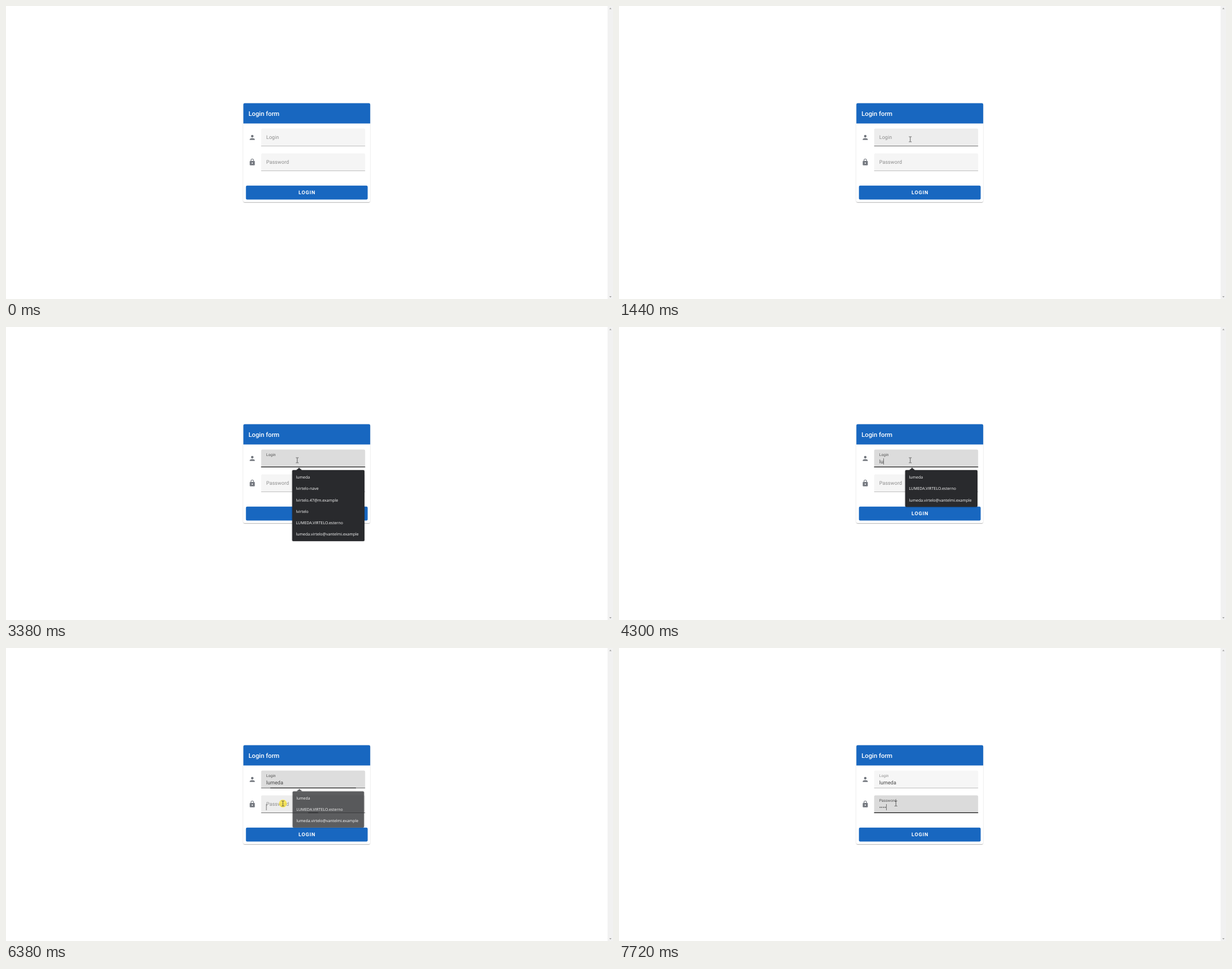
These frames come from a looping animation (1077x520 px, 8000 ms). An HTML page:

```html
<!DOCTYPE html>
<html lang="en">
<head>
<meta charset="utf-8">
<title>Login form</title>
<style>
  html, body { margin: 0; width: 100%; height: 100%; overflow: hidden; background: #fff; }
  svg { position: absolute; left: 0; top: 0; font: 9px Roboto, sans-serif; text-rendering: geometricPrecision; }
  .card {
    position: absolute; left: 421.2px; top: 172.6px; width: 225px; height: 175.4px; border-radius: 2.25px;
    box-shadow: 0 1.7px .6px -1.1px #0003, 0 1.1px 1.1px #00000024, 0 .6px 2.8px #0000001f;
  }
  .title { font-size: 11.25px; font-weight: 500; fill: #fff; }
  .button { font-weight: 700; letter-spacing: .0893em; fill: #fff; text-anchor: middle; }
  .label { letter-spacing: .009em; }
  .value { letter-spacing: .009em; fill: #444; }
  .icon { fill: #757980; }
  .popup { font: 7px "Open Sans", "Noto Sans", sans-serif; fill: #fff; filter: drop-shadow(0 .6px 1.2px #0006); }
</style>
</head>
<body>
<div class="card"></div>
<svg width="1077" height="520" viewBox="0 0 1077 520">
  <rect x="1067.4" width="9.6" height="520" fill="#f1f1f1"/>
  <path d="M1070.4 5.4l2-2.4 2 2.4zM1070.4 515l2 2.4 2-2.4z" fill="#a3a3a3"/>
  <path d="M421.2 208.6V174.85q0-2.25 2.25-2.25H643.95q2.25 0 2.25 2.25V208.6z" fill="#1867c0"/>
  <text class="title" x="430.2" y="194.5">Login form</text>
  <path class="icon" transform="translate(430.2 226.6) scale(.5625)" d="M12 4a4 4 0 0 1 0 8a4 4 0 0 1 0-8M12 14c4.42 0 8 1.79 8 4v2H4v-2c0-2.21 3.58-4 8-4z"/>
  <path class="icon" fill-rule="evenodd" transform="translate(430.2 270.4) scale(.5625)" d="M12 17a2 2 0 0 0 0-4a2 2 0 0 0 0 4M18 8a2 2 0 0 1 2 2v10a2 2 0 0 1-2 2H6a2 2 0 0 1-2-2V10a2 2 0 0 1 2-2h1V6a5 5 0 0 1 10 0v2zM12 3a3 3 0 0 0-3 3v2h6V6a3 3 0 0 0-3-3z"/>
  <g id="fields"></g>
  <rect x="425.7" y="318.8" width="216" height="24.75" rx="2.25" fill="#1867c0"/>
  <text class="button" x="534.1" y="334.3">LOGIN</text>
  <g id="popup" class="popup"></g>
  <circle id="click" r="7" fill="#f7e13c" opacity=".8"/>
  <path id="arrow" d="M0 0v9.5l2.2-2 1.4 3.3 1.4-.6L3.6 7h3z" fill="#fff" stroke="#000" stroke-width=".5"/>
  <path id="beam" d="M-2.4-4.5H-.6L0-4 .6-4.5H2.4M0-4V4M-2.4 4.5H-.6L0 4 .6 4.5H2.4" fill="none" stroke="#333" stroke-width=".75"/>
</svg>
<script>
const LOOP = 8000, FIELD_W = 184.5;
const $ = id => document.getElementById(id);
const set = (el, attrs) => { for (const k in attrs) el.setAttribute(k, attrs[k]); };
const show = (el, on) => { el.style.display = on ? '' : 'none'; };
const clamp = v => Math.min(1, Math.max(0, v));
const easeOut = p => 1 - (1 - p) ** 3;
const gray = v => `rgb(${v},${v},${v})`;

// Linear interpolation through [time, value] points
function track(t, points) {
  let [t0, v0] = points[0];
  for (const [t1, v1] of points) {
    if (t < t1) return v0 + (v1 - v0) * clamp((t - t0) / (t1 - t0));
    [t0, v0] = [t1, v1];
  }
  return v0;
}

const BURSTS = [[260, 950, 11], [1090, 1440, 6], [1770, 2110, 6], [5700, 6240, 9], [6380, 6650, 5]];
function tick(t) {
  let m = 0;
  for (const [start, end, steps] of BURSTS) {
    if (t < start) break;
    const dt = (end - start) / (steps - 1);
    m = Math.min(end, start + Math.floor((t - start) / dt + .15) * dt);
  }
  return m;
}

function makeField(name, y) {
  const g = document.createElementNS('http://www.w3.org/2000/svg', 'g');
  set(g, { transform: `translate(452.7 ${y})` });
  g.innerHTML = `
    <path d="M0 31.5V2.25Q0 0 2.25 0H182.25Q184.5 0 184.5 2.25V31.5z"/>
    <rect y="30.9" width="${FIELD_W}" height=".6"/>
    <rect y="30.4" height="1.1"/>
    <text class="label">${name}</text>
    <text class="value" x="9" y="24.4"></text>
    <rect y="15.6" width=".6" height="11" fill="#222"/>`;
  $('fields').append(g);
  const [box, line, focusLine, label, value, caret] = g.children;
  return s => {
    set(box, { fill: gray(s.shade) });
    set(line, { opacity: s.line });
    set(focusLine, { x: FIELD_W * (1 - s.focus) / 2, width: FIELD_W * s.focus });
    set(label, {
      transform: `translate(9 ${18.9 - 7.5 * s.float}) scale(${1 - .25 * s.float})`,
      fill: gray(s.ink)
    });
    value.textContent = s.text;
    set(caret, { x: 9 + (s.text ? value.getComputedTextLength() : 0) });
    show(caret, s.caret);
  };
}
const drawLogin = makeField('Login', 217.5);
const drawPassword = makeField('Password', 261.4);

const LOGIN = 'lumeda', LOGIN_KEYS = [4170, 4300, 4500, 4700, 4900, 5030];
const PASSWORD_KEYS = [7250, 7390, 7590, 7720];
const SUGGESTIONS = ['lumeda', 'lvirtelo-nave', 'lvirtelo.47@m.example', 'lvirtelo',
  'LUMEDA.VIRTELO.esterno', 'lumeda.virtelo@vantelmi.example'];
const typed = (t, keys) => keys.filter(k => t >= k).length;
const flips = (t, times) => times.filter(k => t >= k).length % 2 === 1;

let shownPrefix = null;
function drawPopup(m, prefix) {
  const open = track(m, [[1800, 0], [2030, 1], [6340, 1], [6505, 0]]);
  show($('popup'), open > 0);
  if (prefix !== shownPrefix) {
    shownPrefix = prefix;
    const rows = SUGGESTIONS.filter(s => s.toLowerCase().startsWith(prefix));
    $('popup').innerHTML = `
      <rect x="507.8" y="254" width="128.2" height="${4.5 + 20.25 * rows.length}" rx="1.8" fill="#292a2d"/>
      <path d="M515 254.2l5-4.4 5 4.4z" fill="#292a2d"/>` +
      rows.map((s, i) => `<text x="514.5" y="${269.2 + 20.25 * i}">${s}</text>`).join('');
  }
  const k = 1 - .05 * (1 - open);
  set($('popup'), { opacity: open, transform: `translate(572 287) scale(${k}) translate(-572 -287)` });
}

function drawPointer(m) {
  const enter = easeOut(clamp((m - 260) / 690)), leave = easeOut(clamp((m - 5700) / 540));
  const settle = track(m, [[1090, 0], [1230, 10.5], [1440, 7.5]]);
  const x = 540 - 22 * enter + track(m, [[1090, 0], [1440, -1.2]]) - 25.5 * leave;
  const y = 229 * enter + settle + 39.5 * leave;
  const overField = (y > 217.5 && y < 249) || y > 261.4;
  const at = { transform: `translate(${x} ${y})` };
  for (const id of ['arrow', 'beam', 'click']) set($(id), at);
  show($('arrow'), m >= 260 && !overField);
  show($('beam'), overField);
  show($('click'), (m >= 1770 && m < 1900) || (m >= 6380 && m < 6510));
}

function draw(t) {
  const m = tick(t);
  const count = typed(t, LOGIN_KEYS);
  drawLogin({
    shade: track(m, [[690, 245], [940, 237], [1770, 237], [2020, 220], [6370, 220], [6580, 246]]),
    line: track(m, [[690, .38], [940, .87], [6380, .87], [6580, .38]]),
    focus: track(m, [[1770, 0], [2020, 1], [6350, 1], [6520, 0]]),
    float: track(m, [[1770, 0], [1950, 1]]),
    ink: track(m, [[1770, 140], [1980, 80], [6380, 80], [6580, 140]]),
    text: LOGIN.slice(0, count),
    caret: flips(t, [1838, 2370, 2900, 3380, 3910, 5560, 6090, 6380])
  });
  drawPassword({
    shade: track(m, [[5850, 245], [6100, 237], [6380, 237], [6570, 219]]),
    line: track(m, [[5850, .38], [6100, .87]]),
    focus: track(m, [[6360, 0], [6570, 1]]),
    float: track(m, [[6380, 0], [6560, 1]]),
    ink: track(m, [[6380, 140], [6570, 80]]),
    text: '•'.repeat(typed(t, PASSWORD_KEYS)),
    caret: flips(t, [6380, 6920, 7250])
  });
  drawPopup(m, LOGIN.slice(0, Math.min(count, 2)));
  drawPointer(m);
}

const start = performance.now();
function frame() {
  draw((performance.now() - start) % LOOP);
  requestAnimationFrame(frame);
}
frame();
</script>
</body>
</html>
```
